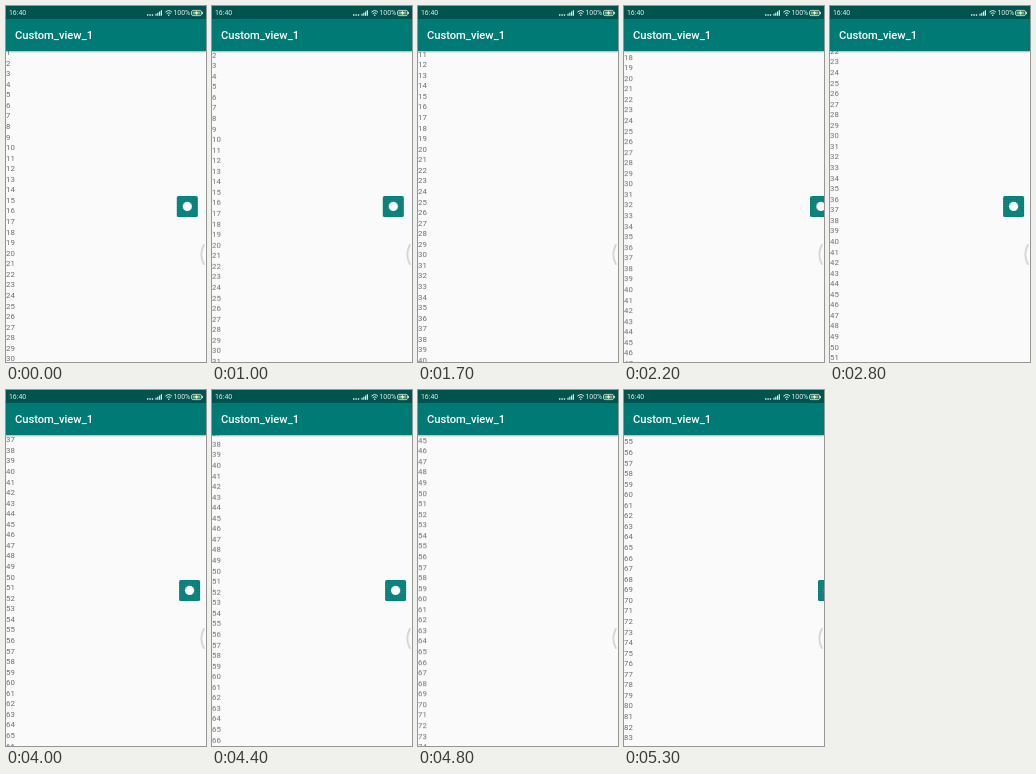
Recreate the animation shown at these times as an HTML page. Size 200x356 px, loop 5400 ms.

```html
<!DOCTYPE html>
<html lang="en">
<head>
<meta charset="utf-8">
<title>Custom_view_1</title>
<style>
  html, body { margin: 0; width: 100%; height: 100%; overflow: hidden; }
  body { position: relative; background: #fafafa; font-family: Roboto, sans-serif; }
  #list { position: absolute; left: 0; top: 41.6px; color: #6e6e6e; font-size: 7.8px; line-height: 10.556px; will-change: transform; }
  #fab { position: absolute; left: 0; top: 190px; width: 21px; height: 21px; will-change: transform; }
  #fab svg { display: block; }
  #edge { position: absolute; left: 190px; top: 236px; }
  #bar { position: absolute; left: 0; top: 0; width: 200px; height: 45px; background: #007a75; box-shadow: 0 1px 1.5px rgba(0, 0, 0, .3); }
  #status { position: absolute; left: 0; top: 0; width: 200px; height: 13.3px; background: #00544e; }
  #bar span { position: absolute; white-space: nowrap; }
  #title { left: 8.9px; top: 14.2px; line-height: 31.1px; font-size: 11.2px; font-weight: 500; color: #fff; }
  .info { top: 1px; line-height: 13.6px; font-size: 6.9px; color: #e4efed; }
  #bar svg { position: absolute; left: 0; top: 0; }
</style>
</head>
<body>
<div id="list"></div>

<div id="fab">
  <svg width="21" height="21" viewBox="0 0 21 21">
    <rect width="21" height="21" rx="1.6" fill="#007d76"/>
    <path id="grid" stroke="#fff" stroke-opacity=".14" stroke-width=".4"/>
    <circle cx="10.5" cy="10.4" r="4.6" fill="#fff"/>
  </svg>
</div>

<svg id="edge" width="10" height="26" viewBox="0 0 10 26">
  <path d="M7.8 3Q2.8 12.5 7.8 22" fill="none" stroke="#d6d6d6" stroke-width="2" stroke-linecap="round"/>
</svg>

<div id="bar">
  <div id="status">
    <span class="info" style="left:3px">16:40</span>
    <span class="info" style="left:167.4px">100%</span>
    <svg width="200" height="13" fill="#dcebe8">
      <path d="M141 8.3h1.4v1.4h-1.4zM143.4 8.3h1.4v1.4h-1.4zM145.8 8.3h1.4v1.4h-1.4z"/>
      <path d="M149.4 7.8h1.2v2h-1.2zM151.2 6.8h1.2v3h-1.2zM153 5.6h1.2v4.2h-1.2zM154.8 4.3h1.2v5.5h-1.2z"/>
      <g fill="none" stroke="#dcebe8">
        <path d="M159.4 6.2Q162.7 3 166 6.2M160.7 7.7Q162.7 5.8 164.7 7.7"/>
        <rect x="185.5" y="4.4" width="10" height="5.2" rx="1.6" stroke-width=".8"/>
      </g>
      <circle cx="162.7" cy="9.2" r=".8"/>
      <rect x="196" y="5.9" width=".9" height="2.2"/>
      <rect x="186.7" y="5.6" width="7.6" height="2.8" rx=".6" fill="#7fb56a"/>
      <path d="M191 4.6L188.8 7.3H190.4L189.9 9.4L192.2 6.6H190.6Z" fill="#fff"/>
    </svg>
  </div>
  <span id="title">Custom_view_1</span>
</div>

<script>
const LOOP = 5400, STEP = 100, ROWS = 90;

// Each swipe eases the list up by dist px.
const swipes = [
  { start: 784, time: 1735, dist: 192 },
  { start: 2444, time: 1370, dist: 185 },
  { start: 4277, time: 1154, dist: 195 }
];

// The button leaves to the right and comes back once per period.
const HOME = 170.8, AWAY = 202;
const HIDE_AT = 1100, PERIOD = 1600, SHOW_AFTER = 800, SLIDE_TIME = 600;

function ease(u) {
  u = Math.min(1, Math.max(0, u));
  return u * u * (3 - 2 * u);
}

function scrollAt(t) {
  return swipes.reduce((y, s) => y + s.dist * ease((t - s.start) / s.time), 0);
}

function buttonAt(t) {
  if (t < HIDE_AT) return HOME;
  const p = (t - HIDE_AT) % PERIOD;
  const hidden = ease(p / SLIDE_TIME) - ease((p - SHOW_AFTER) / SLIDE_TIME);
  return HOME + (AWAY - HOME) * hidden;
}

const list = document.getElementById('list');
const fab = document.getElementById('fab');
for (let n = 1; n <= ROWS; n++) {
  const row = document.createElement('div');
  row.textContent = n;
  list.append(row);
}

let grid = '';
for (let p = 2.1; p < 20; p += 2.1) grid += `M${p} 0V21M0 ${p}H21`;
document.getElementById('grid').setAttribute('d', grid);

const start = performance.now();
function draw() {
  const elapsed = Math.max(0, performance.now() - start) % LOOP;
  const t = Math.floor(elapsed / STEP) * STEP;
  list.style.transform = `translateY(${-scrollAt(t)}px)`;
  fab.style.transform = `translateX(${buttonAt(t)}px)`;
  requestAnimationFrame(draw);
}
draw();
</script>
</body>
</html>
```
